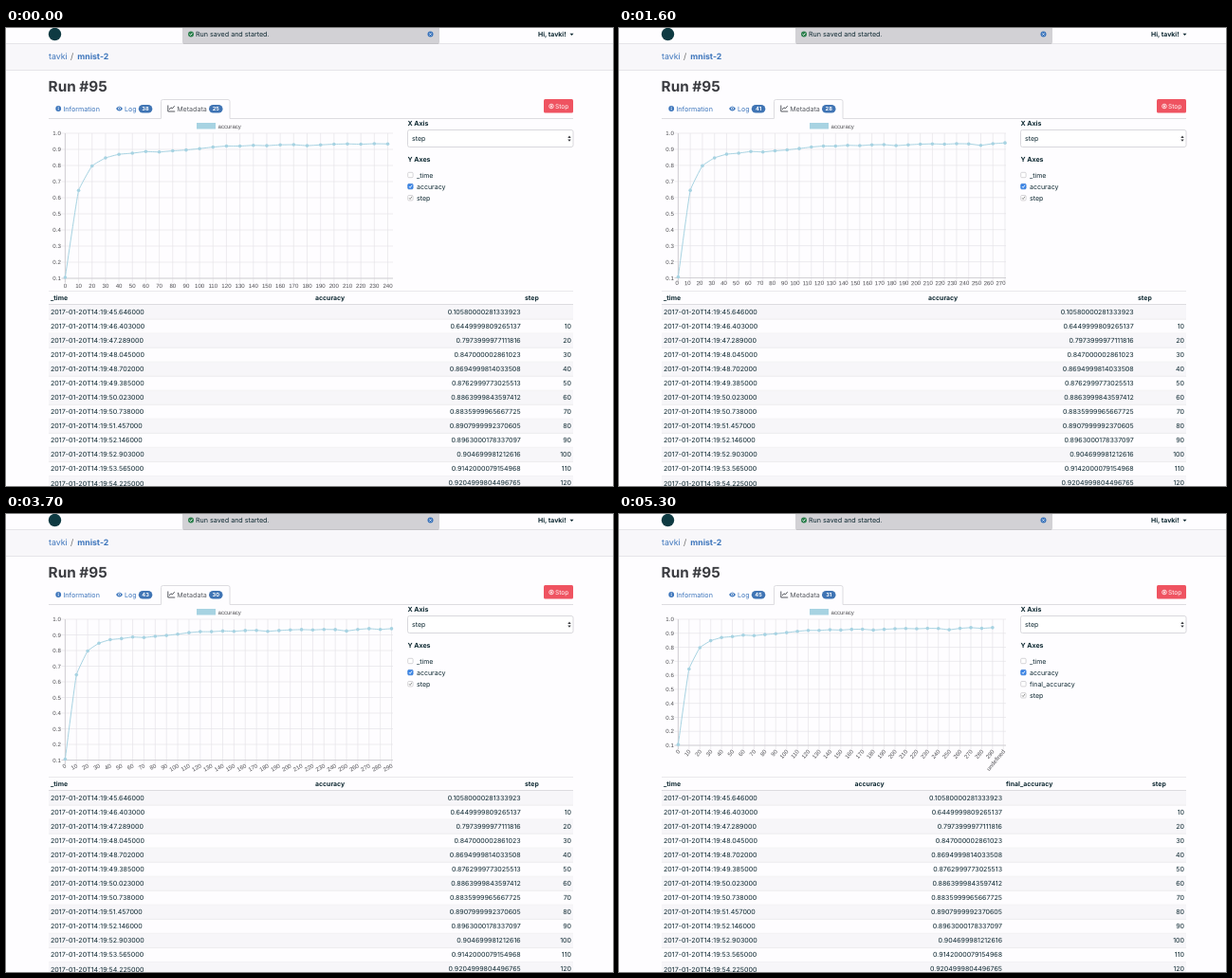
Recreate the animation shown at these times as an HTML page. Size 640 by 483 pixels, loop 5400 ms.

```html
<!DOCTYPE html>
<html lang="en">
<head>
<meta charset="utf-8">
<title>Run metadata</title>
<style>
  html, body { margin: 0; width: 100%; height: 100%; overflow: hidden; background: #fefdff; }
  svg { display: block; width: 640px; height: 483px; }
  text {
    font-family: Inter, "Open Sans", sans-serif;
    font-feature-settings: "calt" 0;
    text-rendering: geometricPrecision;
    white-space: pre;
  }
  .axis { font-family: "Liberation Sans", Arial, sans-serif; }
</style>
</head>
<body>
<svg id="stage" viewBox="0 0 640 483" xmlns="http://www.w3.org/2000/svg">
  <g id="page"></g>
  <g id="live"></g>
</svg>
<script>
const LOOP = 5400;
const INK = '#0c2730', LINK = '#3b74bb', SERIES = '#a7d3e2', LINE = '#dddce0';
const LEFT = 62.4, TOP = 111, RIGHT = 408;

// Each state: start time, points, log count, metadata count, chart bottom, last tick x, label angle
const states = [
  { at: 0,    points: 25, log: 38, meta: 25, bottom: 264,   end: 402.5, angle: 0 },
  { at: 100,  points: 26, log: 39, meta: 26, bottom: 264,   end: 402.5, angle: 0 },
  { at: 1000, points: 28, log: 41, meta: 28, bottom: 263.5, end: 407,   angle: 2 },
  { at: 2700, points: 30, log: 43, meta: 30, bottom: 259.5, end: 406.5, angle: 30 },
  { at: 3800, points: 30, log: 45, meta: 31, bottom: 244,   end: 405.3, angle: 50, done: true }
];

const accuracy = [
  '0.10580000281333923', '0.6449999809265137', '0.7973999977111816', '0.847000002861023',
  '0.8694999814033508', '0.8762999773025513', '0.8863999843597412', '0.8835999965667725',
  '0.8907999992370605', '0.8963000178337097', '0.904699981212616', '0.9142000079154968',
  '0.9204999804496765'
];
const seconds = ['45.646', '46.403', '47.289', '48.045', '48.702', '49.385', '50.023',
  '50.738', '51.457', '52.146', '52.903', '53.565', '54.225'];
const values = accuracy.map(Number).concat(
  [.9205, .925, .923, .928, .929, .923, .928, .932, .934, .932, .935, .934, .925, .935, .94, .935, .94]);

const rect = (x, y, w, h, fill, extra = '') =>
  `<rect x="${x}" y="${y}" width="${w}" height="${h}" fill="${fill}" ${extra}/>`;
const circle = (x, y, r, fill) => `<circle cx="${x}" cy="${y}" r="${r}" fill="${fill}"/>`;
const stroke = (d, color, width = 1) =>
  `<path d="${d}" fill="none" stroke="${color}" stroke-width="${width}"/>`;
const shape = (d, fill) => `<path d="${d}" fill="${fill}"/>`;

// y is the middle of the capitals
function text(str, x, y, { size = 7, fill = INK, bold = false, anchor = 'start', extra = '' } = {}) {
  return `<text x="${x}" y="${y + size * 0.36}" font-size="${size}" fill="${fill}" ` +
    `font-weight="${bold ? 700 : 400}" text-anchor="${anchor}" ${extra}>${str}</text>`;
}
const axisText = (str, x, y, anchor, extra = '') =>
  text(str, x, y, { size: 6.1, fill: '#4c4c50', anchor, extra: 'class="axis" ' + extra });

function header() {
  return rect(0, 16, 640, 28.5, '#f8f7fa') +
    stroke('M0 16.5H640M0 44.5H640', '#e6e5e9') +
    circle(51.5, 6.5, 6.7, '#0e3a42') +
    text('Hi, tavki!', 561, 6.5, { size: 6.9, bold: true }) +
    shape('M594.5 5.7h4l-2 2.2z', INK) +
    rect(186, -4, 271, 21, '#d2d1d5', 'rx="2"') +
    stroke('M187 16.5H456', '#c3c2c6') +
    circle(195, 6.5, 3, '#2d7f4d') +
    stroke('M193.6 6.5l1 1.1 1.8-2.1', '#fff', 0.9) +
    text('Run saved and started.', 200, 6.5, { size: 7.15 }) +
    circle(447.5, 6.5, 3, LINK) +
    stroke('M446.4 5.4l2.2 2.2m0-2.2l-2.2 2.2', '#fff', 0.8) +
    text('tavki', 45, 30, { size: 8.8, fill: LINK }) +
    text('/', 68, 30, { size: 8.8, fill: '#666' }) +
    text('mnist-2', 75.3, 30, { size: 8.7, fill: LINK, bold: true }) +
    text('Run #95', 44.6, 61.5, { size: 15.3, fill: '#3b3c41', bold: true });
}

function tabs() {
  return stroke('M45 95.5H163.5V77.5q0-2 2-2H234q2 0 2 2V95.5H598', LINE) +
    circle(55.2, 85, 2.9, LINK) +
    stroke('M55.2 84.5v2M55.2 82.9v.9', '#fff', 0.9) +
    text('Information', 60.4, 85, { size: 7.15, fill: LINK }) +
    shape('M116 85q3.5-5 7 0q-3.5 5-7 0z', LINK) +
    circle(119.5, 84.8, 1.5, '#fefdff') + circle(119.5, 84.8, 0.9, LINK) +
    text('Log', 125, 85, { size: 7.1, fill: LINK }) +
    stroke('M170.8 81.5v6.5h7.4M172 86l2-2.2 1.3 1.2 2.4-2.8', '#44484e', 0.9) +
    text('Metadata', 180.2, 85, { size: 7.1, fill: '#55595f' }) +
    rect(567, 75, 31, 14.6, '#ef5361', 'rx="1.5"') +
    `<circle cx="575" cy="82.5" r="2.3" fill="none" stroke="#fff" stroke-width=".8"/>` +
    rect(574.1, 81.6, 1.8, 1.8, '#fff') +
    text('Stop', 579, 82.5, { size: 6.6, fill: '#fff' });
}

function sidebar() {
  return text('X Axis', 423.5, 100, { bold: true }) +
    rect(423.5, 107.5, 174.5, 18, '#fff', 'rx="2" stroke="#d9d8dd"') +
    text('step', 428, 116) +
    shape('M592.3 116l1.7-2.4 1.7 2.4zM592.3 117.4h3.4l-1.7 2.4z', '#3b3c41') +
    text('Y Axes', 423.5, 138, { bold: true });
}

function checkbox(label, y, mark) {
  const on = mark === 'on';
  let out = rect(423.7, y - 2.7, 5.4, 5.4, on ? '#3b86e8' : '#fff',
    `rx="1" stroke="${on ? '#3478d2' : '#c4c3c8'}" stroke-width=".7"`);
  if (mark) out += stroke(`M425 ${y}l1.1 1.3 1.9-2.8`, on ? '#fff' : '#888', 0.9);
  return out + text(label, 433, y, { size: 7 });
}

function badge(n, x) {
  return rect(x, 81, 14.5, 8.6, '#3f74b4', 'rx="4.3"') +
    text(n, x + 7.25, 85.2, { size: 5.7, fill: '#fff', bold: true, anchor: 'middle' });
}

// Gently smoothed line whose handles follow the neighbours of each point
function spline(pts, tension = 0.1) {
  const handles = pts.map((p, i) => {
    const a = pts[i - 1] || p, b = pts[i + 1] || p;
    const before = Math.hypot(p[0] - a[0], p[1] - a[1]);
    const after = Math.hypot(b[0] - p[0], b[1] - p[1]);
    const move = k => [p[0] + k * (b[0] - a[0]), p[1] + k * (b[1] - a[1])];
    const unit = tension / (before + after);
    return { from: move(-unit * before), to: move(unit * after) };
  });
  return pts.map((p, i) => i
    ? `C${handles[i - 1].to} ${handles[i].from} ${p}`
    : `M${p}`).join('');
}

function chart({ points, bottom, end, angle, done }) {
  const ticks = points + (done ? 1 : 0);
  const step = (end - LEFT) / (ticks - 1);
  const scale = (bottom - TOP) / 0.9;
  let grid = '', labels = '';
  for (let i = 0; i < 10; i++) {
    const y = TOP + scale * i / 10;
    grid += `M58.5 ${y}H${RIGHT}`;
    labels += axisText((1 - i / 10).toFixed(1), 57.8, y, 'end');
  }
  for (let i = 0; i < ticks; i++) {
    const x = LEFT + i * step;
    const name = i < points ? i * 10 : 'undefined';
    grid += `M${x} ${TOP}V${bottom + 4.5}`;
    if (angle) {
      const y = bottom + 5.3;
      labels += axisText(name, x + 0.5, y, 'end', `transform="rotate(${-angle} ${x + 0.5} ${y})"`);
    } else {
      labels += axisText(name, x, bottom + 7.7, 'middle');
    }
  }
  const pts = values.slice(0, points).map((v, i) => [LEFT + i * step, TOP + (1 - v) * scale]);
  return rect(201, 100, 20, 6.5, SERIES) +
    axisText('accuracy', 223.5, 103.4, 'start') +
    stroke(grid, '#e5e4e8', 0.7) +
    stroke(`M${LEFT} ${TOP}V${bottom + 4.5}M58.5 ${bottom}H${RIGHT}`, '#c6c5c9', 0.7) +
    labels +
    stroke(spline(pts), SERIES, 1) +
    pts.map(p => circle(...p, 1.8, SERIES)).join('');
}

function table({ done }) {
  const right = done ? 404 : 542.7;
  const head = (name, x) => text(name, x, 284.3, { size: 6.9, bold: true });
  let out = stroke('M45 277.5H598', '#e9e8ec') +
    head('_time', 47) + head('accuracy', done ? 248.5 : 326) + head('step', done ? 562 : 547);
  if (done) out += head('final_accuracy', 408);
  accuracy.forEach((v, i) => {
    const y = 299.6 + i * 15.03;
    if (i % 2 === 0) out += rect(45, y - 7.5, 553, 15, '#f7f6f9');
    out += stroke(`M45 ${y + 7.5}H598`, '#e6e5e9', 0.7) +
      text(`2017-01-20T14:19:${seconds[i]}000`, 47, y, { size: 7.1 }) +
      text(v, right, y, { size: 7.05, anchor: 'end' });
    if (i) out += text(i * 10, 596, y, { size: 7.05, anchor: 'end' });
  });
  return out + stroke('M45 291.5H598', LINE);
}

function liveView(state) {
  const boxes = [['_time', ''], ['accuracy', 'on']];
  if (state.done) boxes.push(['final_accuracy', '']);
  boxes.push(['step', 'dim']);
  return badge(state.log, 139.8) + badge(state.meta, 214) +
    boxes.map(([label, mark], i) => checkbox(label, 155 + i * 12.1, mark)).join('') +
    chart(state) + table(state);
}

const live = document.getElementById('live');
document.getElementById('page').innerHTML = header() + tabs() + sidebar();

let shown = null;
function update(time) {
  const t = time % LOOP;
  const state = states.filter(s => s.at <= t).pop();
  if (state !== shown) {
    live.innerHTML = liveView(state);
    shown = state;
  }
}

const start = performance.now();
function tick() {
  update(performance.now() - start);
  requestAnimationFrame(tick);
}
tick();
</script>
</body>
</html>
```
